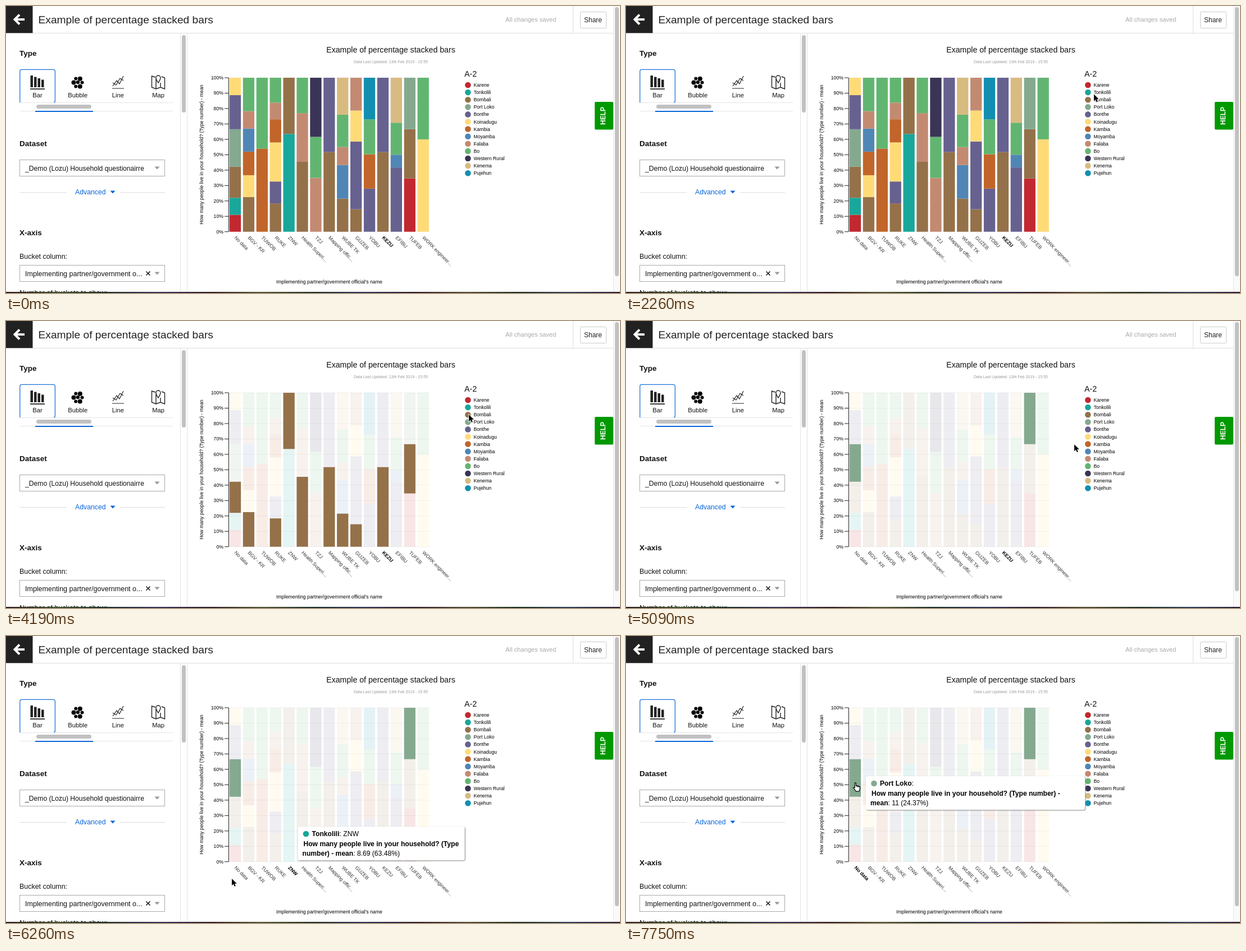
Write an HTML page that moves like this. It is 1093x512 px and loops after 8000 ms.

```html
<!DOCTYPE html>
<html lang="en">
<head>
<meta charset="utf-8">
<title>Percentage stacked bars</title>
<style>
  html, body { margin: 0; width: 100%; height: 100%; overflow: hidden; background: #fff; }
  svg { display: block; width: 1093px; height: 512px; font-family: "Liberation Sans", Arial, sans-serif; }
  .tip { filter: drop-shadow(1px 1px 1px #888); }
</style>
</head>
<body>
<svg id="stage" viewBox="0 0 1093 512"></svg>
<script>
const areas = {
  ka: ["Karene", "#c1282f"], to: ["Tonkolili", "#18a79a"], bm: ["Bombali", "#947149"],
  pl: ["Port Loko", "#84a98f"], bn: ["Bonthe", "#67618f"], ko: ["Koinadugu", "#ffdb78"],
  km: ["Kambia", "#c1652a"], mo: ["Moyamba", "#5086b5"], fa: ["Falaba", "#c38a72"],
  bo: ["Bo", "#62b571"], wr: ["Western Rural", "#3a3456"], ke: ["Kenema", "#d8bb80"],
  pu: ["Pujehun", "#128fb0"]
};

// Running percentages from the bottom up.
const bars = {
  "No data": { ka: 11, to: 22, bm: 42.2, pl: 66.57, bn: 88.7, ko: 100 },
  "BGV - KR": { bm: 22.5, ko: 36.7, km: 52, mo: 67, fa: 78.3, bo: 100 },
  "TUWOB": { km: 54, bo: 100 },
  "RUKE": { bm: 18.4, bn: 32.6, ko: 58, km: 73, fa: 83.8, bo: 100 },
  "ZNW": { to: 63.48, bm: 100 },
  "Health Superi…": { bm: 45.4, fa: 77, bo: 100 },
  "TZJ": { fa: 35, bo: 61.6, wr: 100 },
  "Mapping offic…": { bm: 51.7, bn: 100 },
  "WUBE TK": { bm: 21.5, mo: 43.3, fa: 55, bo: 76, ke: 100 },
  "GUZEB": { bm: 14.6, bn: 58.6, ko: 78.7, fa: 100 },
  "YOBU": { bn: 28, km: 50.3, bo: 73, pu: 100 },
  "KEZU": { bm: 51.7, bn: 100 },
  "EFIBU": { bn: 41.7, mo: 50, bo: 70.8, ke: 100 },
  "TUFEB": { ka: 34.6, bm: 66.6, pl: 100 },
  "WORK engineer…": { ko: 60, bo: 100 }
};

// Pointer moves: start step, end step, destination. It rests in between.
const moves = [
  [-7, -5, 1040, 407], [-3, 0, 982, 390], [0, 6, 821, 139],
  ...[1, 2].map(row => [3 + 6 * row, 5 + 6 * row, 821 + 1.5 * row, 139 + 14 * row]),
  [22, 27, 750, 318], [27, 28, 646, 378], [28, 32, 402, 433], [32, 40, 408, 261]
];
const LOOP = 8000, STEP = 148, START = 1515;
const LEFT = 397.9, PITCH = 23.9, WIDTH = 20.3, BASE = 402.7, UNIT = 2.747;
const level = p => BASE - p * UNIT;

const text = (x, y, size, str, more = "") =>
  `<text x="${x}" y="${y}" font-size="${size}" ${more}>${str}</text>`;
const rect = (x, y, w, h, fill, more = "") =>
  `<rect x="${x}" y="${y}" width="${w}" height="${h}" fill="${fill}" ${more}/>`;
const dot = (x, y, r, fill) => `<circle cx="${x}" cy="${y}" r="${r}" fill="${fill}"/>`;
const shape = (d, more) => `<path d="${d}" ${more}/>`;
const line = (d, color, width = 1) => shape(d, `fill="none" stroke="${color}" stroke-width="${width}"`);
const caret = (x, y, fill) => shape(`M${x - 4.5} ${y}h9l-4.5 5z`, `fill="${fill}"`);
const strong = s => `<tspan font-weight="700">${s}</tspan>`;
const repeat = (n, draw) => Array.from({ length: n }, (_, i) => draw(i)).join("");
const bold = 'font-weight="700"', mid = 'text-anchor="middle"';

function header() {
  return line("M47 48.5H1081M1009.5 0V48", "#dedede") + rect(0, 0, 47.5, 48.3, "#212121") +
    line("M33 24H16M24 15.5L15.5 24 24 32.5", "#fff", 4) +
    text(57.5, 30.5, 19.2, "Example of percentage stacked bars", 'fill="#222"') +
    text(889, 28, 11.15, "All changes saved", 'fill="#aaa"') +
    rect(1022.5, 10.5, 46, 29, "#fff", 'stroke="#ccc" rx="1"') +
    text(1045, 29, 12, "Share", mid + ' fill="#222"');
}

function icons() {
  const bubble = i => dot(128 + 7.5 * Math.cos(i * 1.05), 136.5 + 8 * Math.sin(i * 1.05), 3 + i % 2, "#000");
  return repeat(4, i => rect(43.5 + i * 6.5, 124 + i * 2.5, 4.5, 21 - i * 2.5, "#222")) +
    line("M43 148H69", "#222", 1.8) + repeat(6, bubble) + dot(128, 136, 3.2, "#000") +
    line("M189 147H210M190 143L197 133 202 139 209 125M190 137L196 141 203 129 209 133", "#222", 1.2) +
    line("M266 127L259.5 125V145L267 148 275 145 282.5 148V128L277 126M267 130V148M275 137V145", "#222", 1.4) +
    line("M271 137Q267 131 267 128A4 4 0 0 1 275 128Q275 131 271 137Z", "#222", 1.4) +
    ["Bar", "Bubble", "Line", "Map"].map((s, i) => text(56 + i * 71.7, 163, 11.2, s, mid)).join("");
}

function panel() {
  const heading = (y, s) => text(24, y, 13.5, s, bold);
  const select = (y, s, size) => rect(24.5, y + .5, 258, 29, "#fff", 'stroke="#aaa"') +
    text(34, y + 19.5, size, s) + caret(269, y + 12.5, "#999");
  return `<g fill="#111">` + heading(89, "Type") + heading(249.5, "Dataset") + heading(409, "X-axis") +
    line("M24.8 172V117Q24.8 113.4 28 113.4H84Q87.4 113.4 87.4 117V169Q87.4 172 85 172", "#1f73dc", 1.3) +
    icons() + line("M24 172.5H297M24 187.5H297", "#e4e4e4") +
    rect(54, 176, 98, 7, "#c1c1c1", 'rx="3.5"') + rect(52, 187, 103, 2, "#0a66d8") +
    select(274, "_Demo (Lozu) Household questionairre", 12.15) +
    line("M24 332.5H108M203 332.5H283", "#ddd") +
    text(123, 336, 12.3, "Advanced", 'fill="#0a66d8"') + caret(190, 329.5, "#0a66d8") +
    text(24, 451, 12.45, "Bucket column:") +
    select(462, "Implementing partner/government o...", 12.5) +
    line("M249.5 473.5l7 7m0-7l-7 7", "#222", 1.6) +
    text(24, 516, 12.6, "Number of buckets to show:") + `</g>` +
    line("M310.5 49V510M322.5 49V510", "#e2e2e2") + rect(313, 52, 7, 138, "#c1c1c1", 'rx="3.5"');
}

function chart() {
  const tick = i => line(`M396 ${level(i * 10)}H755`, "#f2f2f2") + line(`M389 ${level(i * 10)}H396`, "#222") +
    text(387, level(i * 10) + 2.8, 8.7, i * 10 + "%", 'text-anchor="end"');
  const legend = ([name, color], i) =>
    dot(822.3, 141 + i * 13.1, 5.3, color) + text(832.5, 144 + i * 13.1, 8.65, name);
  return text(685, 83, 14.15, "Example of percentage stacked bars", mid + ' fill="#111"') +
    text(685, 101.5, 7.05, "Data Last Updated: 13th Feb 2019 - 15:55", mid + ' fill="#999"') +
    text(0, 0, 8.7, "How many people live in your household? (Type number) - mean",
      mid + ' transform="translate(351 265) rotate(-90)"') +
    text(575.5, 495, 8.75, "Implementing partner/government official's name", mid) +
    text(816, 126, 14.2, "A-2", 'fill="#111"') + repeat(11, tick) +
    line(`M396.5 128V${BASE}`, "#222") + Object.values(areas).map(legend).join("");
}

function edges() {
  const stop = i => `<stop offset="${i / 12}" stop-color="hsl(${i * 85} 30% ${i % 2 ? 25 : 13}%)"/>`;
  return `<linearGradient id="strip">${repeat(13, stop)}</linearGradient>` +
    rect(1081, 0, 12, 512, "#fafafa") + line("M1081.5 0V510", "#e6e6e6") +
    rect(1084, 2, 7, 480, "#c1c1c1", 'rx="3.5"') + rect(0, 510, 1093, 2, "url(#strip)") +
    rect(1048, 171, 33, 49.5, "#090", 'rx="2"') +
    text(0, 0, 12, "HELP", `${bold} ${mid} fill="#fff" transform="translate(1067 196) rotate(-90)"`);
}

function drawBars(lit, boldBar) {
  return Object.entries(bars).map(([label, parts], i) => {
    let low = 0;
    const segments = Object.entries(parts).map(([key, high]) => {
      const height = (high - low) * UNIT;
      low = high;
      return rect(LEFT + i * PITCH, level(high), WIDTH, height, areas[key][1],
        !lit || lit === key ? "" : 'opacity=".115"');
    });
    return segments.join("") + text(0, 0, 8.75, label, (i === boldBar ? bold : 'fill="#333"') +
      ` transform="translate(${406 + i * PITCH} 414) rotate(45)"`);
  }).join("");
}

function tooltip(x, y, w, key, bucket, ...lines) {
  const [name, color] = areas[key];
  return rect(x, y, w, 60, "#fff", 'rx="3" class="tip"') + dot(x + 14.5, y + 13, 5.3, color) +
    text(x + 25, y + 17.3, 12.15, `${strong(name)}: ${bucket}`) +
    lines.map((s, i) => text(x + 10 - 2 * i, y + 34.7 + 17.1 * i, 12.1, s)).join("");
}

function drawTip(k, x, y) {
  const ask = "How many people live in your household? (Type";
  if (k < 27) return "";
  if (k < 31) return tooltip(336, 307, 399, "ko", "WORK engineer - GuWK", strong(ask + " number) - mean") + ":", "3 (60%)");
  if (k < 35) return tooltip(519.5, 340, 297, "to", "ZNW", strong(ask), strong("number) - mean") + ": 8.69 (63.48%)");
  const parts = Object.entries(bars["No data"]);
  const n = parts.findIndex(([, high]) => level(high) < y);
  const share = parts[n][1] - (n ? parts[n - 1][1] : 0);
  return tooltip(x + 19, y - 11, 390, parts[n][0], "", strong(ask + " number) -"),
    `${strong("mean")}: ${+(share * .4514).toFixed(2)} (${share.toFixed(2)}%)`);
}

function pointer(x, y) {
  const overBars = x < 754 && y < 402;
  return overBars
    ? shape("M3 8V1.5Q4-.4 5 1.5V6Q8 5 11.5 7.3V10Q11 13 10 15H5Q3 12 .8 9.6Q.6 7.6 3 9ZM7 6V8M9.2 6.5V8.4",
      `transform="translate(${x - 4} ${y}) scale(1.08)" fill="#fff" stroke="#000" stroke-width="1.1"`)
    : shape("M0 0V12L2.9 9.4 4.8 13.8 6.8 13 5 8.7H8.8Z",
      `transform="translate(${x} ${y})" stroke="#fff" stroke-width="1.6" paint-order="stroke"`);
}

function locate(k) {
  let x = 1054, y = 439;
  for (const [from, to, toX, toY] of moves) {
    const u = Math.min(1, Math.max(0, (k - from) / (to - from)));
    const f = u * u * (3 - 2 * u);
    x += (toX - x) * f;
    y += (toY - y) * f;
  }
  return [x, y];
}

function scene(k) {
  // The pointer reaches a new legend row every six steps; the fourth row stays lit.
  const row = Math.min(3, Math.floor((k - 5) / 6));
  const lit = k < 6 ? null : Object.keys(areas)[row];
  const boldBar = k < 27 ? 11 : k < 31 ? 14 : k < 35 ? 4 : 0;
  const [x, y] = locate(k);
  return drawBars(lit, boldBar) + drawTip(k, x, y) + (k < -7 ? "" : pointer(x, y));
}

const stage = document.getElementById("stage");
stage.innerHTML = header() + panel() + chart() + edges() + '<g id="live"></g>';
const live = document.getElementById("live");
const begin = performance.now();
let shown = null;

function tick() {
  const t = (performance.now() - begin) % LOOP;
  const k = Math.floor((t - START) / STEP);
  if (k !== shown) live.innerHTML = scene(shown = k);
  requestAnimationFrame(tick);
}
tick();
</script>
</body>
</html>
```
